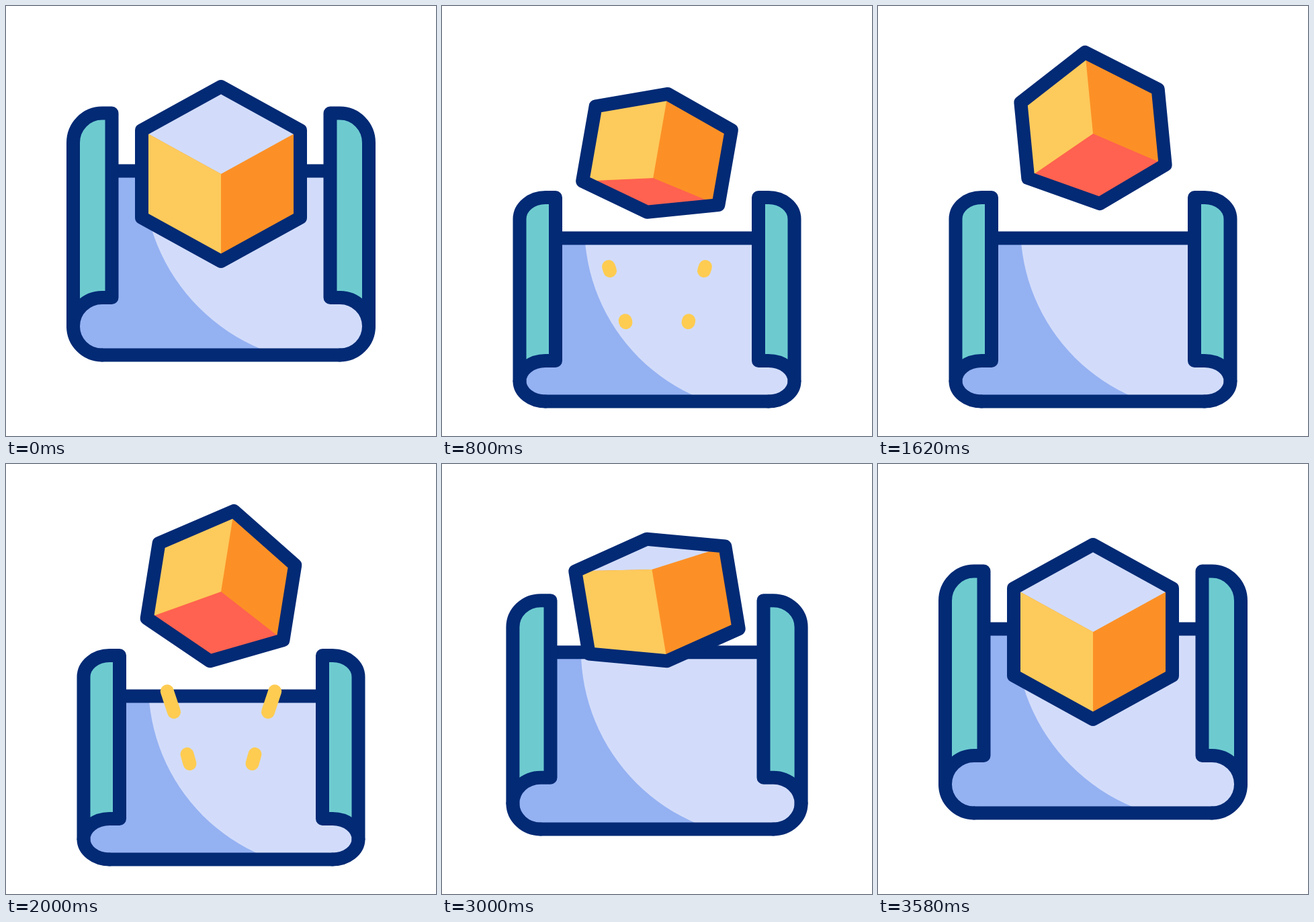
These frames come from a looping animation (640x640 px, 3600 ms). An HTML page with a canvas:

```html
<!DOCTYPE html>
<html lang="en">
<head>
<meta charset="utf-8">
<title>Cube and scroll</title>
<style>
html, body { margin: 0; height: 100%; overflow: hidden; background: #fff; }
canvas { display: block; width: 640px; height: 640px; }
</style>
</head>
<body>
<canvas id="stage" width="640" height="640"></canvas>
<script>
const ctx = document.getElementById('stage').getContext('2d');
const LOOP = 3600, SIZE = 640, HALF = Math.PI / 2;
const NAVY = '#022a75', TEAL = '#6dcbd0', BLUE = '#94b1f2', LILAC = '#d2dcfa';
const YELLOW = '#fdca5c', ORANGE = '#fc9026', RED = '#ff6250', RAY = '#ffcc52';

const mix = (a, b, k) => a + (b - a) * k;

// Eased step from 0 to 1 between two times
function ramp(t, start, end) {
  const u = Math.min(1, Math.max(0, (t - start) / (end - start)));
  return (1 - Math.cos(Math.PI * u)) / 2;
}

// Swings back and forth between turning points, at rest outside them
function swing(t, times) {
  let value = 0, sign = 1;
  for (let i = 1; i < times.length; i++, sign = -sign) {
    const size = i === 1 || i === times.length - 1 ? 1 : 2;
    value += sign * size * ramp(t, times[i - 1], times[i]);
  }
  return value;
}

function polygon(points) {
  const path = new Path2D();
  points.forEach(p => path.lineTo(...p));
  path.closePath();
  return path;
}

function fill(path, color) {
  ctx.fillStyle = color;
  ctx.fill(path);
}

function stroke(path, color = NAVY) {
  ctx.strokeStyle = color;
  ctx.stroke(path);
}

// Draws the left half, then mirrors it for the right
function bothSides(draw) {
  for (const side of [1, -1]) {
    ctx.save();
    if (side < 0) ctx.transform(-1, 0, 0, 1, SIZE, 0);
    draw();
    ctx.restore();
  }
}

function drawScroll(t) {
  const p = ramp(t, 200, 603) - ramp(t, 2700, 3203);
  const left = 100 + 15.5 * p, bar = 157.5 + 11.5 * p, bend = 143 + 11 * p;
  const top = 159.5 + 125.5 * p, line = 245.5 + 100 * p;
  const foot = 434 + 94 * p, bottom = 519.5 + 69 * p;
  const mid = (foot + bottom) / 2, rx = bend - left, ry = bottom - mid, rt = 44 - 12 * p;
  const right = SIZE - bend;

  const body = new Path2D();
  body.moveTo(bar, line);
  body.lineTo(SIZE - bar, line);
  body.lineTo(SIZE - bar, foot);
  body.ellipse(right, mid, rx, ry, 0, -HALF, HALF);
  body.ellipse(bend, mid, rx, ry, 0, HALF, 3 * HALF);
  body.lineTo(bar, foot);
  body.closePath();

  const edge = new Path2D();
  edge.moveTo(bar, line);
  edge.lineTo(SIZE - bar, line);
  edge.moveTo(bend, bottom);
  edge.lineTo(right, bottom);

  const flap = new Path2D();
  flap.moveTo(bar, foot);
  flap.lineTo(bar, top);
  flap.ellipse(bend, top + rt, rx, rt, 0, -HALF, -2 * HALF, true);
  flap.lineTo(left, mid);
  flap.ellipse(bend, mid, rx, ry, 0, 2 * HALF, 3 * HALF);
  flap.closePath();

  const curl = new Path2D();
  curl.ellipse(bend, mid, rx, ry, 0, HALF, 2 * HALF);

  const light = new Path2D(), r = 284 - 8 * p;
  light.arc(204 + 8 * p + r, 248 + 80 * p, r, 0, 4 * HALF);

  fill(body, BLUE);
  ctx.save();
  ctx.clip(body);
  fill(light, LILAC);
  ctx.restore();
  stroke(edge);
  bothSides(() => {
    fill(flap, TEAL);
    stroke(flap);
    stroke(curl);
  });
}

// Rays grow upward from their lower end, then shrink into the upper one
function drawRays(t, start, shift) {
  const span = 440;
  if (t < start || t > start + 2 * span) return;
  const from = 1 - ramp(t, start, start + span);
  const to = 1 - ramp(t, start + span, start + 2 * span);
  const rays = new Path2D();
  const add = (x, y, dx, dy) => {
    rays.moveTo(x + dx * from, y + dy * from + shift);
    rays.lineTo(x + dx * to, y + dy * to + shift + 0.01);
  };
  add(225.5, 320, 24.5, 74);
  add(264, 437, 9.5, 34);
  bothSides(() => stroke(rays, RAY));
}

function drawCube(t) {
  // view: 1 from above, 0 edge-on, -1 from below
  const view = 1 - ramp(t, 200, 620) - ramp(t, 620, 1000) + ramp(t, 2200, 2680) + ramp(t, 2680, 3500);
  const scale = 1 - 0.13 * (ramp(t, 200, 600) - ramp(t, 2200, 3500));
  const y = 250 + 6 * ramp(t, 200, 600) - 66 * ramp(t, 600, 1000)
    - 3 * ramp(t, 2200, 2680) + 63 * ramp(t, 2780, 3450);
  const tilt = 10 * swing(t, [200, 780, 1405, 2095, 2920, 3450]);

  const fromAbove = view > -1e-6, open = Math.abs(view);
  const w = 118 * scale, side = 65 * scale, tip = mix(79, 130, open) * scale;
  const joint = (fromAbove ? -72 : 72) * (1 - open) * scale;
  const skew = 8.5 * Math.min(0, view);
  const T = [0, skew - tip], J = [0, joint], B = [0, skew + tip];
  const LT = [-w, -side], RT = [w, -side], LB = [-w, side], RB = [w, side];
  const hull = polygon([T, RT, RB, B, LB, LT]);

  ctx.save();
  ctx.translate(SIZE / 2, y);
  ctx.rotate(tilt * Math.PI / 180);
  fill(hull, ORANGE);
  if (fromAbove) {
    fill(polygon([LT, T, RT, J]), LILAC);
    fill(polygon([LT, J, B, LB]), YELLOW);
  } else {
    fill(polygon([LB, J, RB, B]), RED);
    fill(polygon([LT, T, J, LB]), YELLOW);
  }
  stroke(hull);
  ctx.restore();
}

function frame() {
  const t = performance.now() % LOOP;
  ctx.fillStyle = '#fff';
  ctx.fillRect(0, 0, SIZE, SIZE);
  ctx.lineWidth = 20;
  ctx.lineCap = ctx.lineJoin = 'round';
  drawScroll(t);
  drawRays(t, 720, 0);
  drawRays(t, 1805, -25);
  drawCube(t);
  requestAnimationFrame(frame);
}
frame();
</script>
</body>
</html>
```
